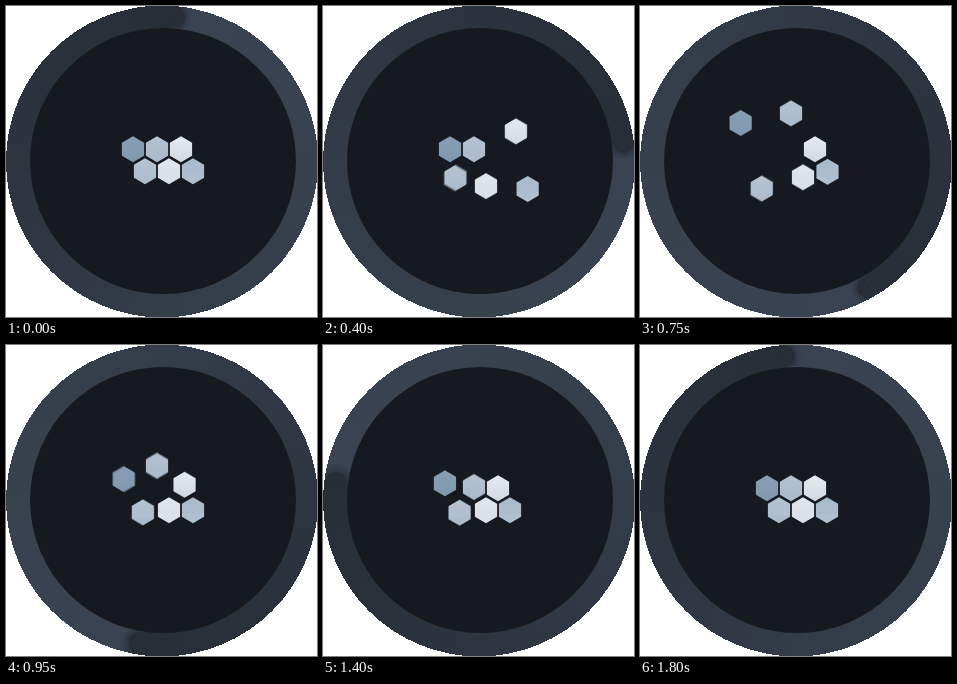
These frames come from a looping animation (311x311 px, 1.85 s). An HTML page:

```html
<!DOCTYPE html>
<html lang="en">
<head>
<meta charset="utf-8">
<title>Hexagon loader</title>
<style>
  html, body { margin: 0; width: 100%; height: 100%; overflow: hidden; background: #fff; }
  #stage { position: relative; width: 311px; height: 311px; overflow: hidden; contain: strict; }
  #ring {
    position: absolute; left: -3.2px; top: -4.7px; width: 320px; height: 320px;
    background: conic-gradient(#394352, #38424f 25%, #333c49 50%, #2b333e 78%, #272e38);
    border-radius: 50%;
  }
  svg { position: absolute; left: 0; top: 0; display: block; overflow: hidden; }
  .cell { isolation: isolate; }
  .cell path { mix-blend-mode: plus-lighter; }
</style>
</head>
<body>
<div id="stage">
  <div id="ring"></div>
  <svg width="311" height="311" viewBox="0 0 311 311">
    <defs>
      <filter id="soft" x="-50%" y="-50%" width="200%" height="200%">
        <feGaussianBlur stdDeviation="3"/>
      </filter>
      <clipPath id="ahead"><rect x="156.8" y="-10" width="60" height="60"/></clipPath>
    </defs>
    <g id="head" clip-path="url(#ahead)">
      <circle cx="159.3" cy="10.7" r="11.5" fill="#14181f" opacity=".75" filter="url(#soft)"/>
      <circle cx="156.8" cy="10.7" r="11.5" fill="#272e38"/>
    </g>
    <circle cx="157" cy="155" r="133" fill="#161a20"/>
    <path fill="#fff" fill-rule="evenodd" shape-rendering="crispEdges"
      d="M-10-10H330V330H-10ZM0 155.5a156 156 0 1 0 312 0a156 156 0 1 0-312 0Z"/>
    <g id="cells"></g>
  </svg>
</div>
<script>
  const LOOP = 1850, STEP = 50;
  const SHUTTER = 16, SAMPLES = 4;
  const SVG_NS = 'http://www.w3.org/2000/svg';
  const ring = document.getElementById('ring');
  const head = document.getElementById('head');
  const defs = document.querySelector('defs');
  const D = Math.SQRT1_2;

  // Rest position, direction, start time, pace, big and small swing, top and bottom colours
  const cells = [
    { x: 175, y: 143.3, dx: D, dy: -D, start: 35, pace: 1, big: 29.5, small: 7.5, fill: ['#e4e9ee', '#d0d7de'] },
    { x: 187, y: 165.3, dx: D, dy: D, start: 132, pace: 1, big: 25, small: 7.8, fill: ['#a6b8ca', '#b0bfce'] },
    { x: 163, y: 165.3, dx: 0, dy: 1, start: 240, pace: 1, big: 18.5, small: 10, fill: ['#dfe3ea', '#d8dce4'] },
    { x: 139, y: 165.3, dx: -D, dy: D, start: 345, pace: 1.04, big: 31, small: 6.5, fill: ['#b4c2d0', '#a9bacb'] },
    { x: 127, y: 143.3, dx: -D, dy: -D, start: 445, pace: 1, big: 38, small: 7.5, fill: ['#869cb2', '#7f97ae'] },
    { x: 151, y: 143.3, dx: 0, dy: -1, start: 534, pace: .95, big: 37, small: 8, fill: ['#b2c0cf', '#a9b9c9'] }
  ];

  function add(parent, tag, attrs) {
    const node = document.createElementNS(SVG_NS, tag);
    for (const key in attrs) node.setAttribute(key, attrs[key]);
    return parent.appendChild(node);
  }

  // Each cell is a stack of equal layers that add up to a motion blur
  cells.forEach((cell, i) => {
    const gradient = add(defs, 'linearGradient', { id: 'tone' + i, x1: 0, y1: 0, x2: 0, y2: 1 });
    cell.fill.forEach((color, k) => add(gradient, 'stop', { offset: k, 'stop-color': color }));
    const group = add(document.getElementById('cells'), 'g', { class: 'cell' });
    cell.layers = Array.from({ length: SAMPLES }, () => add(group, 'path', {
      d: 'M0-13L11.1-6.5V6.5L0 13L-11.1 6.5V-6.5Z', fill: `url(#tone${i})`, opacity: 1 / SAMPLES
    }));
  });

  function bigSwing(t) {
    if (t <= 0 || t >= 660) return 0;
    return t < 270 ? Math.sin(Math.PI / 2 * t / 270)
                   : (1 + Math.cos(Math.PI * (t - 270) / 390)) / 2;
  }

  function smallSwing(t) {
    const u = (t - 845) / 265;
    return u <= 0 || u >= 1 ? 0 : Math.sin(Math.PI * u) ** 1.3;
  }

  function place(cell, node, time) {
    const t = time - cell.start;
    const shift = cell.big * bigSwing(t / cell.pace) + cell.small * smallSwing(t);
    node.setAttribute('transform', `translate(${cell.x + cell.dx * shift} ${cell.y + cell.dy * shift})`);
  }

  function render(time) {
    const angle = 3.5 + 360 * time / LOOP;
    ring.style.transform = `rotate(${angle}deg)`;
    head.setAttribute('transform', `rotate(${angle} 156.8 155.3)`);
    for (const cell of cells) {
      cell.layers.forEach((node, k) => place(cell, node, time + SHUTTER * ((k + .5) / SAMPLES - .5)));
    }
  }

  const begin = performance.now();
  function tick() {
    const elapsed = (performance.now() - begin) % LOOP;
    render(Math.floor(elapsed / STEP) * STEP);
    requestAnimationFrame(tick);
  }
  tick();
</script>
</body>
</html>
```
